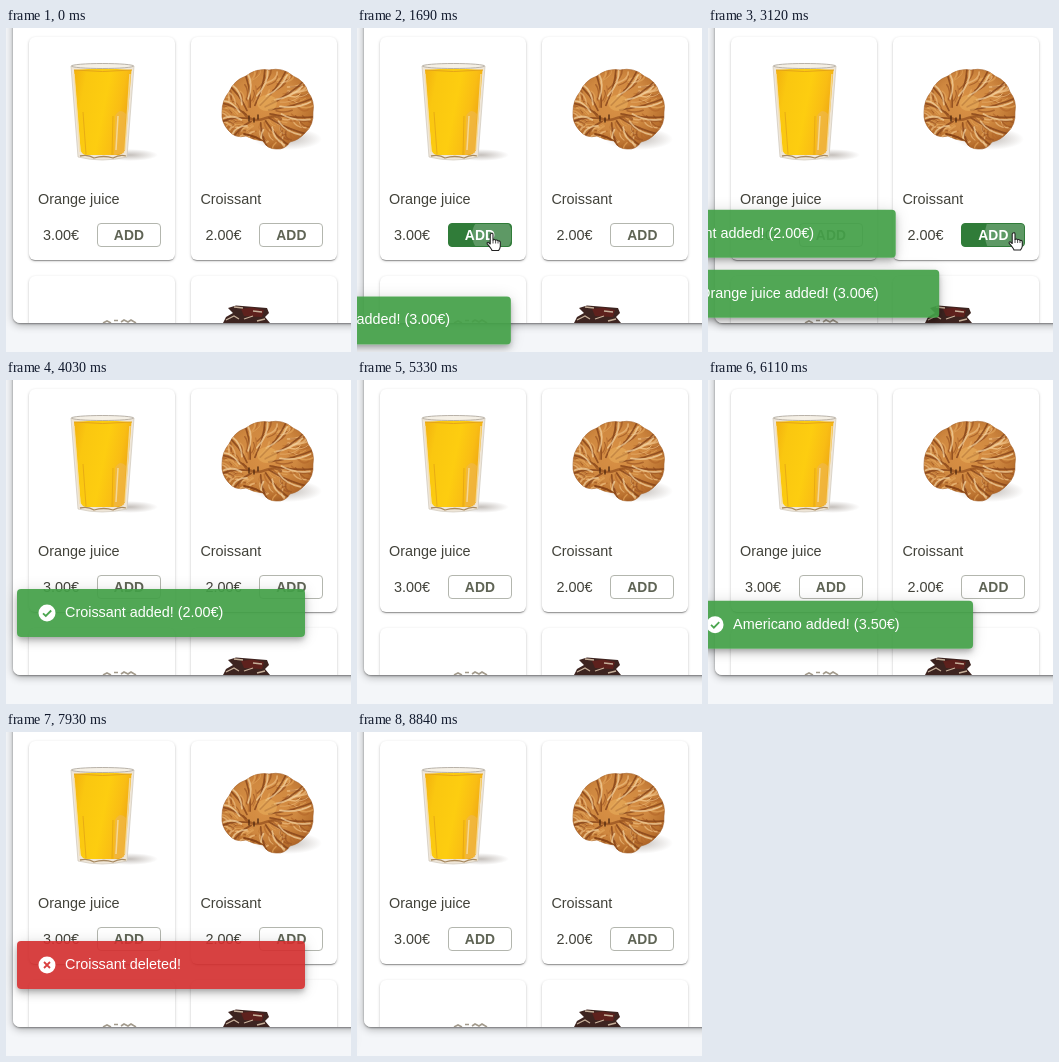
Animation of 345x324 px, one loop 8970 ms. Source, as an HTML page:

```html
<!DOCTYPE html>
<html lang="en">
<head>
<meta charset="utf-8">
<title>Shop snackbars</title>
<style>
  html, body { margin: 0; width: 100%; height: 100%; overflow: hidden; }
  body { position: relative; background: #f4f6f9; font: 14.4px/18px "Liberation Sans", Arial, sans-serif; color: #42423a; }
  #stage { position: absolute; left: 0; top: 0; width: 345px; height: 324px; overflow: hidden; }
  #stage * { position: absolute; box-sizing: border-box; white-space: nowrap; }
  .panel, .shade { left: 7px; top: -20px; width: 360px; height: 315px; border-radius: 0 0 0 7px; }
  .panel { background: #fff; overflow: hidden; }
  .shade { box-shadow: 0 1px 2px rgba(0,0,0,.4), 0 2px 9px rgba(0,0,0,.3); }
  .card { width: 146px; height: 223px; border-radius: 6px; background: #fff;
    box-shadow: 0 2px 1px -1px rgba(0,0,0,.2), 0 1px 1px rgba(0,0,0,.14), 0 1px 3px rgba(0,0,0,.22); }
  .name { left: 9px; top: 153.5px; }
  .price { left: 14px; top: 189.5px; }
  .add { left: 68px; top: 186.5px; width: 64px; height: 24px; border: 1px solid #b3b6ae; border-radius: 4px;
    overflow: hidden; font-weight: bold; font-size: 13.8px; line-height: 23px; letter-spacing: .2px;
    text-align: center; color: #5f6455; }
  #stage .add span { position: relative; }
  .add.hover { background: #307c39; border-color: #307c39; color: #fff; }
  .ripple { border-radius: 50%; background: #fff; }
  #food { left: 0; top: 0; }
  .toast { left: 11px; top: 0; width: 288px; height: 48px; border-radius: 4px; color: #fff; line-height: 47px;
    background: rgba(67,160,71,.92);
    box-shadow: 0 3px 5px -1px rgba(0,0,0,.2), 0 5px 9px rgba(0,0,0,.14), 0 1px 16px rgba(0,0,0,.12); }
  .toast.bad { background: rgba(211,47,47,.91); }
  .toast svg { left: 21px; top: 15px; }
  .toast span { left: 48px; top: 0; }
</style>
</head>
<body>
<div id="stage">
  <div class="shade"></div>
  <div class="panel" id="panel"></div>
  <svg id="food" width="345" height="295" viewBox="0 0 345 295">
    <defs>
      <linearGradient id="juice" x2="1" y2=".3">
        <stop offset="0" stop-color="#f2b00f"/><stop offset=".22" stop-color="#fac710"/>
        <stop offset=".6" stop-color="#fdcd10"/><stop offset=".85" stop-color="#f9bd14"/>
        <stop offset="1" stop-color="#f0ab14"/>
      </linearGradient>
      <radialGradient id="crust" cx=".48" cy=".42" r=".62">
        <stop offset="0" stop-color="#d99145"/><stop offset=".55" stop-color="#cf8840"/>
        <stop offset=".85" stop-color="#b9702e"/><stop offset="1" stop-color="#9c5620"/>
      </radialGradient>
      <radialGradient id="shadow">
        <stop offset="0" stop-color="#8a8078" stop-opacity=".5"/>
        <stop offset="1" stop-color="#8a8078" stop-opacity="0"/>
      </radialGradient>
      <clipPath id="loaf"><path id="outline" d="M216 84 Q216 72 223 64 Q228 52 240 48 Q250 40 263 42 Q277 39 287 48 Q299 53 302 64 Q309 73 307 84 Q308 97 299 105 Q293 112 284 114 Q279 122 270 121 Q261 121 257 113 Q247 112 240 108 Q229 111 222 102 Q215 94 216 84Z"/></clipPath>
    </defs>
    <ellipse cx="124" cy="127" rx="28" ry="6" fill="url(#shadow)"/>
    <path d="M65 38 Q96 34 128 38 L121 129 Q96 135 72 129Z" fill="#efe6d8" stroke="#cfc8bb" stroke-width=".7"/>
    <path d="M68 42 Q96 39 125.500 42 L119 122 Q116 128 110 127 L83 127 Q76 128 74.500 122Z" fill="url(#juice)"/>
    <ellipse cx="96.500" cy="38" rx="31" ry="2.500" fill="#f5f0e6" stroke="#aaa398" stroke-width=".8"/>
    <path d="M68 42 Q96 45 126 42" fill="none" stroke="#e5a518"/>
    <path d="M108 127 L109 88 Q114 79 120 86 L118 125Z" fill="#efb74a" opacity=".7"/>
    <path d="M77 84 L80 126 M107 88 L106 127" fill="none" stroke="#e3a416" opacity=".8"/>
    <path d="M68 46 L74 124 M112 88 L110 122 M124 46 L119 122" stroke="#f5dfac" stroke-width="1.500" opacity=".8"/>
    <path d="M74 128 Q82 126 88 130 Q98 127 107 130 Q114 126 120 128" fill="none" stroke="#a88a60" stroke-width="1.300"/>
    <ellipse cx="282" cy="111" rx="34" ry="11" fill="url(#shadow)"/>
    <use href="#outline" fill="url(#crust)" stroke="#a5642c" stroke-width=".6"/>
    <g id="folds" clip-path="url(#loaf)" fill="none" stroke-linecap="round"></g>
    <path d="M97 295 l4 -2 4 2 M108 292.500 h4 M115 294 l3 -2 4 2 3 -2 5 3" fill="none" stroke="#a29a8c" stroke-width="1.600"/>
    <path d="M217 295 L220 289 L227 285 L222 280 L230 277.500 L261 280 L263 285 L259 289 L264 295Z" fill="#3d2420"/>
    <path d="M235 281 L246 279.500 L258 282 L256 289 L238 288Z" fill="#5e211d"/>
    <path d="M220 292 L228 288 L233 291 M238 291 L247 288 M251 293 L259 291 M228 279 L237 280 M247 283 L256 284" fill="none" stroke="#c7b09a" stroke-width="1.300"/>
  </svg>
  <div id="toasts"></div>
  <svg id="cursor" width="18" height="22" viewBox="0 0 18 22" style="left:0;top:0">
    <path d="M5 1.500 Q6.800 .6 7 2.500 V8 Q8.500 6.800 9.500 8.300 Q11 7.300 12 9 Q14 8.300 14.300 10.500 V14.500 Q14 17 12.500 18.500 H6 Q5.500 16.500 1.200 11.800 Q.8 10 2.300 10.300 L4.200 12 V2.500Z"
      fill="#fff" stroke="#222" stroke-width="1.100" stroke-linejoin="round"/>
    <path d="M7 8 V11.500 M9.600 8.500 V11.500 M12 9.500 V11.500" stroke="#222" stroke-width=".8"/>
  </svg>
</div>
<script>
const $ = id => document.getElementById(id);
const LOOP = 8970, TICK = 130, SLIDE = 308;

function bezier(x1, x2) {
  // y control points are always 0 and 1
  return p => {
    if (p <= 0) return 0;
    if (p >= 1) return 1;
    let lo = 0, hi = 1, s;
    for (let i = 0; i < 24; i++) {
      s = (lo + hi) / 2;
      const x = 3 * x1 * s * (1 - s) ** 2 + 3 * x2 * s * s * (1 - s) + s ** 3;
      if (x < p) lo = s; else hi = s;
    }
    return s * s * (3 - 2 * s);
  };
}
const easeOut = bezier(0, .2), easeInOut = bezier(.4, .2), sharp = bezier(.4, .6);

// Cards
function addCard(x, y, name, price) {
  const card = document.createElement('div');
  card.className = 'card';
  card.style.left = x - 7 + 'px';
  card.style.top = y + 20 + 'px';
  if (name) card.innerHTML = `<div class="name">${name}</div><div class="price">${price}</div>
    <div class="add"><div class="ripple"></div><span>ADD</span></div>`;
  $('panel').append(card);
  return { x: x + 68, y: y + 186.5, el: card.querySelector('.add'), ripple: card.querySelector('.ripple') };
}
const juice = addCard(23, 8.5, 'Orange juice', '3.00€');
const croissant = addCard(185.4, 8.5, 'Croissant', '2.00€');
addCard(23, 247.5);
addCard(185.4, 247.5);
juice.clicks = [1510];
croissant.clicks = [2140, 2920];

// Croissant crust: seeded flakes and creases that bend outward from the hollow
function drawFolds() {
  let seed = 7, svg = '';
  const rnd = () => (seed = seed * 16807 % 2147483647) / 2147483647;
  const at = (deg, k) => {
    const a = deg * Math.PI / 180;
    return `${252 + 10 * k + (12 + 36 * k) * Math.cos(a)} ${86 - 5 * k + (9 + 33 * k) * Math.sin(a)}`;
  };
  const line = (deg, from, to, bend, color, width, alpha) => {
    svg += `<path d="M${at(deg, from)} Q${at(deg + bend, (from + to) / 2)} ${at(deg + bend * .6, to)}"
      stroke="${color}" stroke-width="${width}" opacity="${alpha}"/>`;
  };
  for (let i = 0; i < 130; i++) {
    const k = rnd() * .75, color = ['#f0c183', '#e5a85c', '#b4682a', '#9a5221'][i % 4];
    line(rnd() * 360, k, k + .2 + rnd() * .25, 14, color, .7 + rnd() * 1.3, .65);
  }
  for (let deg = 125; deg < 440; deg += 26) {
    line(deg, 0, 1.1, 18, '#86441a', 1.7, .8);
    line(deg + 5, .25, .9, 18, '#f6d5a2', 1.8, .7);
  }
  svg += `<ellipse cx="261" cy="75" rx="10" ry="8" fill="#e8ad5c" opacity=".6"/>
    <path d="M237 84 Q245 96 260 90 Q270 86 275 91" stroke="#96501e" stroke-width="2.500" opacity=".75"/>
    <path d="M243 88 v5 M248 90 v4 M252 87 v4" stroke="#4c250d" stroke-width="1.300"/>
    <path d="M238 106 Q250 108 258 114" stroke="#8a4516" stroke-width="1.800"/>`;
  $('folds').innerHTML = svg;
}
drawFolds();

// Snackbars: [start, end, text, deleted]
const toasts = [
  [1641, 2285, 'Orange juice added! (3.00€)'],
  [2270, 3039, 'Croissant added! (2.00€)'],
  [3024, 3665, 'Orange juice added! (3.00€)'],
  [3650, 4190, 'Croissant added! (2.00€)'],
  [5980, 6882, 'Americano added! (3.50€)'],
  [6865, 7535, 'Orange juice deleted!', true],
  [7520, 8490, 'Croissant deleted!', true],
  [8840, LOOP, 'Americano deleted!', true]
].map(([start, end, text, bad]) => {
  const el = document.createElement('div');
  el.className = bad ? 'toast bad' : 'toast';
  const mark = bad ? 'M6 6 L12 12 M12 6 L6 12' : 'M5 9.300 L7.800 12 L13.200 6.500';
  el.innerHTML = `<svg width="18" height="18"><circle cx="9" cy="9" r="8.500" fill="#fff"/>
    <path d="${mark}" fill="none" stroke="${bad ? '#d94040' : '#4ca650'}" stroke-width="1.800"/></svg><span>${text}</span>`;
  $('toasts').append(el);
  return { start, end, el };
});

const rise = (toast, t) => toast ? 60 * easeInOut((t - toast.start - 38) / 175) : 0;

function drawToast(toast, i, t) {
  const shown = t >= toast.start && t < toast.end + 195;
  toast.el.style.display = shown ? '' : 'none';
  if (!shown) return;
  const x = -SLIDE * (1 - easeOut((t - toast.start) / 225) + sharp((t - toast.end) / 195));
  const y = 269 - rise(toast, t) - rise(toasts[i + 1], t);
  toast.el.style.transform = `translate(${x}px, ${y}px)`;
}

// Pointer stops: [time, x, y]
const path = [[1040, 352, 252], [1430, 134, 206], [1760, 134, 206], [2080, 305, 205.5], [3700, 305, 205.5], [4100, 356, 226]];

function pointer(t) {
  const i = path.findIndex(p => p[0] > t);
  if (i < 1) return [400, 400];
  const [a, b] = [path[i - 1], path[i]];
  const p = easeInOut((t - a[0]) / (b[0] - a[0]));
  return [a[1] + (b[1] - a[1]) * p, a[2] + (b[2] - a[2]) * p];
}

function drawButton(button, px, py, t) {
  const x = px - button.x, y = py - button.y;
  const hover = x >= 0 && x <= 64 && y >= 0 && y <= 24;
  button.el.classList.toggle('hover', hover);
  const click = button.clicks.filter(c => c <= t).pop();
  const age = t - click;
  const on = hover && age < 800;
  button.ripple.style.display = on ? '' : 'none';
  if (!on) return;
  const r = (x + 3) * easeInOut(age / 550);
  Object.assign(button.ripple.style, {
    left: x - r + 'px', top: y - r + 'px', width: 2 * r + 'px', height: 2 * r + 'px',
    opacity: .22 * Math.min(1, (800 - age) / 500)
  });
}

function draw(now) {
  const t = Math.floor(now % LOOP / TICK) * TICK;
  const [px, py] = pointer(t);
  $('cursor').style.transform = `translate(${px - 5}px, ${py - 2}px)`;
  drawButton(juice, px, py, t);
  drawButton(croissant, px, py, t);
  toasts.forEach((toast, i) => drawToast(toast, i, t));
}

const begin = performance.now();
function loop() {
  draw(performance.now() - begin);
  requestAnimationFrame(loop);
}
loop();
</script>
</body>
</html>
```
